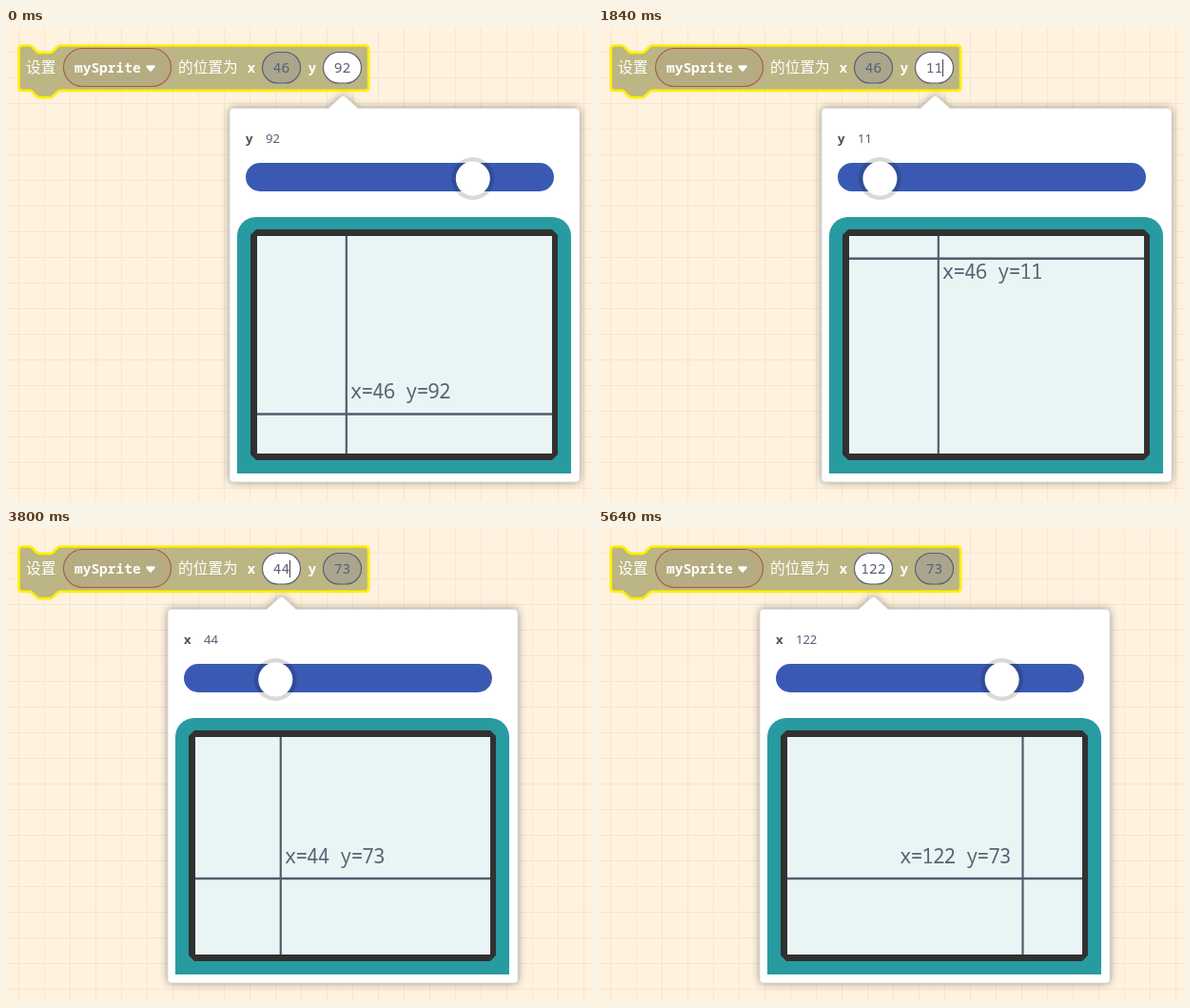
An HTML page for the animation above (5.96 s loop, 616 px wide and 498 px high).

```html
<!DOCTYPE html>
<html lang="zh">
<head>
<meta charset="utf-8">
<title>设置位置</title>
<style>
  html, body { margin: 0; width: 100%; height: 100%; overflow: hidden; }
  body {
    background-color: #fff2df;
    background-image:
      repeating-linear-gradient(90deg, transparent 0 13px, #f3e6d2 13px 14px, transparent 14px 27px),
      repeating-linear-gradient(0deg, transparent 0 13px, #f3e6d2 13px 14px, transparent 14px 27px);
  }
  svg { display: block; width: 616px; height: 498px; }
  text { white-space: pre; }
  .cjk { font: 300 15.7px "Noto Sans CJK SC", "Noto Sans CJK", sans-serif; fill: #fff; }
  .name { font: 700 14.5px "Noto Sans Mono", monospace; fill: #fff; }
  .num { font: 400 14.6px "Noto Sans Mono", monospace; fill: #575e75; text-anchor: middle; }
  .head { font: 400 13px "Noto Sans", sans-serif; fill: #575e75; }
  .bold { font-weight: 700; fill: #4d5058; }
  .label { font: 400 21px "Noto Sans Mono", monospace; letter-spacing: -.95px; fill: #5a6373; }
  .pill { fill: #aaa58d; stroke: #575e75; stroke-width: 1.2; }
  .pill.active { fill: #fff; }
  .pill.hover { stroke: #e6e3d4; stroke-width: 2; }
  .cross { stroke: #525b6c; }
  .box { filter: drop-shadow(0 0 4px rgba(0, 0, 0, .38)); }
</style>
</head>
<body>
<svg viewBox="0 0 616 498">
  <g id="block">
    <path transform="translate(13.5 18.5) scale(.91)" fill="#bcb584" stroke="#fff000" stroke-width="3" stroke-linejoin="round"
      d="M0 4Q0 0 4 0H12c2 0 3 1 4 2l4 4c1 1 2 2 4 2h12c2 0 3-1 4-2l4-4c1-1 2-2 4-2H400q4 0 4 4V48q0 4-4 4H48c-2 0-3 1-4 2l-4 4c-1 1-2 2-4 2h-12c-2 0-3-1-4-2l-4-4c-1-1-2-2-4-2H4q-4 0-4-4Z"/>
    <text class="cjk" x="21" y="47">设置</text>
    <rect x="60.5" y="21.5" width="113" height="40" rx="20" fill="#b5ac81" stroke="#a5574f" stroke-width="1.1"/>
    <text class="name" x="72" y="47">mySprite</text>
    <path d="M148.500 40.500h7l-3.500 4z" fill="#fff" stroke="#fff" stroke-width="2.5" stroke-linejoin="round"/>
    <text class="cjk" x="181" y="47">的位置为</text>
    <text class="name" x="253.500" y="47">x</text>
    <text class="name" x="317.500" y="47">y</text>
    <rect id="pillX" class="pill" x="269.500" y="25.500" width="40" height="32.500" rx="16.250"/>
    <rect id="pillY" class="pill" x="333.500" y="25.500" width="40" height="32.500" rx="16.250"/>
    <text id="numX" class="num" x="289.500" y="47"></text>
    <text id="numY" class="num" x="353.500" y="47"></text>
    <path id="caret" d="M0 33V51" stroke="#444" stroke-width="1"/>
  </g>

  <g id="popup">
    <path class="box" fill="#fff" stroke="#d8dade" stroke-width=".8"
      d="M239 84.500H339l13-12q2.500-2 5 0l13 12H599q4 0 4 4V474q0 4-4 4H239q-4 0-4-4V88.500q0-4 4-4Z"/>
    <text id="axis" class="head bold" x="252" y="121"></text>
    <text id="value" class="head" x="273" y="121"></text>
    <rect x="252" y="142" width="324" height="30" rx="15" fill="#3a59b3"/>
    <g id="thumb">
      <circle cy="158.500" r="22.500" fill="#000" fill-opacity=".15"/>
      <circle cy="158.500" r="18" fill="#fff"/>
    </g>
    <path d="M243 469V219a20 20 0 0 1 20-20H574a20 20 0 0 1 20 20V469Z" fill="#289ba1"/>
    <path d="M257 218l6-6H574l6 6V449l-6 6H263l-6-6Z" fill="#323030"/>
    <path d="M264 219H574V448H264Z" fill="#e9f5f5"/>
    <path id="lineX" class="cross" d="M0 219V448" stroke-width="2.200"/>
    <path id="lineY" class="cross" d="M264 0H574" stroke-width="2.600"/>
    <text id="label" class="label"></text>
  </g>
</svg>
<script>
  const LOOP = 5960, STEP = 40, SWITCH = 3080;
  const $ = id => document.getElementById(id);
  const el = {};
  for (const id of ['pillX', 'pillY', 'numX', 'numY', 'caret', 'popup', 'axis', 'value', 'thumb', 'lineX', 'lineY', 'label'])
    el[id] = $(id);

  // [time, value] of each drag
  const dragY = [[600, 92], [1000, 69.5], [1040, 69.5], [1200, 59.5], [1800, 13.5], [1840, 11],
                 [1920, 4], [1960, 4.5], [2200, 60], [2280, 74], [2320, 73]];
  const dragX = [[3760, 46], [4240, 16], [4280, 14], [4320, 14], [4360, 12], [4400, 14],
                 [4480, 23], [4880, 95], [4960, 105], [5360, 122]];
  const caretOn = [[640, 2600], [SWITCH, 3560], [3800, 5640]];

  function valueAt(keys, t) {
    if (t <= keys[0][0]) return keys[0][1];
    for (let i = 1; i < keys.length; i++) {
      const [t0, a] = keys[i - 1], [t1, b] = keys[i];
      if (t <= t1) return a + (b - a) * (t - t0) / (t1 - t0);
    }
    return keys[keys.length - 1][1];
  }

  // CSS "ease": cubic-bezier(.25, .1, .25, 1)
  function ease(p) {
    if (p <= 0) return 0;
    if (p >= 1) return 1;
    const curve = (a, b, s) => 3 * a * s * (1 - s) ** 2 + 3 * b * s * s * (1 - s) + s ** 3;
    let lo = 0, hi = 1;
    for (let i = 0; i < 24; i++) {
      const mid = (lo + hi) / 2;
      if (curve(.25, .25, mid) < p) lo = mid; else hi = mid;
    }
    return curve(.1, 1, lo);
  }

  const move = (node, x, y) => node.setAttribute('transform', `translate(${x} ${y})`);

  function draw(time) {
    const t = Math.floor(time / STEP) * STEP;
    const editX = t >= SWITCH;
    const rawX = valueAt(dragX, t), rawY = valueAt(dragY, t);
    const x = Math.round(rawX), y = Math.round(rawY);

    el.pillX.classList.toggle('active', editX);
    el.pillY.classList.toggle('active', !editX);
    el.pillX.classList.toggle('hover', t >= 2800 && !editX);
    el.numX.textContent = x;
    el.numY.textContent = y;
    const shown = editX ? x : y;
    const caretX = (editX ? 289.5 : 353.5) + String(shown).length * 4.4;
    move(el.caret, Math.round(caretX - .5) + .5, 0);
    el.caret.style.display = caretOn.some(([a, b]) => t >= a && t < b) ? '' : 'none';

    const open = editX ? ease((t - SWITCH) / 250) : 1;
    move(el.popup, editX ? -65 : 0, -20 * (1 - open));
    el.popup.style.opacity = open;
    el.axis.textContent = editX ? 'x' : 'y';
    el.value.textContent = shown;
    move(el.thumb, 270 + (editX ? rawX * 1.8 : rawY * 2.4), 0);

    const lx = 264.8 + 2.022 * x, ly = 220.6 + 2.02 * y;
    const left = x > 80, above = y > 60;
    move(el.lineX, lx, 0);
    move(el.lineY, 0, ly);
    el.label.textContent = `x=${x} y=${y}`;
    el.label.setAttribute('text-anchor', left ? 'end' : 'start');
    move(el.label, lx + (left ? -13 : 4), ly + (above ? -16.5 : 21));
  }

  const start = performance.now();
  function tick() {
    draw((performance.now() - start) % LOOP);
    requestAnimationFrame(tick);
  }
  draw(0);
  requestAnimationFrame(tick);
</script>
</body>
</html>
```
